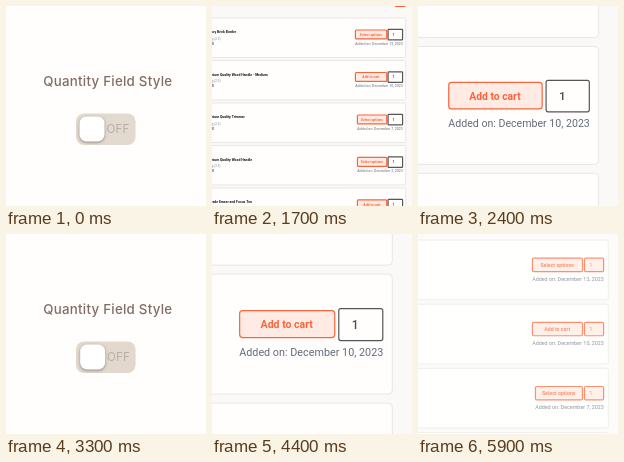
An HTML page with a canvas that plays this animation: 200x200 px, repeating every 6 s.

```html
<!DOCTYPE html>
<html lang="en">
<head>
<meta charset="utf-8">
<title>Quantity field style</title>
<style>
  html, body { margin: 0; width: 100%; height: 100%; overflow: hidden; background: #fffefc; }
  canvas { display: block; width: 200px; height: 200px; }
</style>
</head>
<body>
<canvas id="stage"></canvas>
<script>
const LOOP = 6000, STEP = 100;
const FAR = 28, NEAR = 129; // distance between rows, zoomed out and in
const ORANGE = '#f9643a', PEACH = '#ffebe3', PAPER = '#fffefc';

const ROWS = [
  ['Legacy Brick Border', 'Select options', 'December 13, 2023'],
  ['Premium Quality Wood Handle - Medium', 'Add to cart', 'December 10, 2023'],
  ['Premium Quality Trimmer', 'Select options', 'December 7, 2023'],
  ['Premium Quality Wood Handle', 'Select options', 'December 2, 2023'],
  ['Upgrade Eraser and Focus Ten', 'Add to cart', 'December 1, 2023'],
  ['Legacy Garden Border', 'Select options', 'December 1, 2023']
];
const FOCUS_ROW = 1;

const canvas = document.getElementById('stage');
const ctx = canvas.getContext('2d');
const ratio = window.devicePixelRatio || 1;
canvas.width = canvas.height = 200 * ratio;

const mix = (a, b, p) => a + (b - a) * p;

function ease(t, start, duration) {
  const u = Math.min(1, Math.max(0, (t - start) / duration));
  return u < 0.5 ? 2 * u * u : 1 - 2 * (1 - u) ** 2;
}

// Outlines keep about the same thickness on screen at every zoom.
function box(x, y, w, h, radius, fill, stroke, width = 1.2) {
  ctx.beginPath();
  ctx.roundRect(x, y, w, h, radius);
  ctx.fillStyle = fill;
  ctx.fill();
  if (stroke) {
    ctx.strokeStyle = stroke;
    ctx.lineWidth = width * ratio / ctx.getTransform().a;
    ctx.stroke();
  }
}

function text(string, x, y, font, color, align = 'left', spacing = 0) {
  ctx.font = font;
  ctx.fillStyle = color;
  ctx.textAlign = align;
  ctx.letterSpacing = spacing + 'px';
  ctx.fillText(string, x, y);
}

function drawToggle(on) {
  const labelFont = '11.6px Inter, sans-serif';
  text('Quantity Field Style', 101.8, 79.5, '500 13.3px Inter, sans-serif', '#806c64', 'center', 0.26);
  box(70, 107.4, 59.6, 31.6, 8, '#e3dacf');
  ctx.globalAlpha = on;
  box(70, 107.4, 59.6, 31.6, 8, '#a98b79');
  text('ON', 87, 127.2, labelFont, '#ffffff', 'center');
  ctx.globalAlpha = 1 - on;
  text('OFF', 100.4 + on * 20, 127.2, labelFont, '#b9aca3', 'left', 0.2);
  ctx.globalAlpha = 1;
  ctx.save();
  ctx.shadowColor = 'rgba(75, 65, 85, 0.55)';
  ctx.shadowBlur = 3 * ratio;
  ctx.shadowOffsetY = ratio;
  box(73.5 + on * 27, 110.5, 25, 25, 7, '#ffffff');
  ctx.restore();
}

// Row coordinates start at the right edge of the quantity field, level with its middle.
function drawRow([name, action, date], styled) {
  box(-866, -50, 875, 120, 4, '#fffefd', '#e9e7e5', 1);
  box(-735, -38, 96, 96, 4, '#eee8e1');
  text(name, -600, -4, 'bold 10.4px Roboto, sans-serif', '#101010');
  text('Rating (2.3)', -600, 16, '9px Roboto, sans-serif', '#7d8592');
  text('$24.00', -600, 32, '9px Roboto, sans-serif', '#303030');
  if (styled) box(-552, -41, 13, 2, 0, '#b5b5b5');

  const label = 'Added on: ' + date;
  text(label, 0, 32, '10.8px Roboto, sans-serif', '#626c79', 'right');
  const left = -ctx.measureText(label).width;
  const right = styled ? -43.5 : -49;
  box(left + 0.5, -13.5, right - left, 27, 3, PEACH, ORANGE);
  text(action, (left + right) / 2, 4, 'bold 10.5px Roboto, sans-serif', ORANGE, 'center');

  if (styled) {
    box(-39, -13.5, 38.5, 27, 3, PEACH, ORANGE);
    text('1', -26, 4.5, '11.5px Roboto, sans-serif', ORANGE, 'center');
  } else {
    box(-44.5, -15.5, 44, 32, 2, '#fffefd', '#555658');
    text('1', -28, 4.5, '500 12px Roboto, sans-serif', '#504e49', 'center');
  }
}

function drawList(pitch, focusY, styled) {
  ctx.fillStyle = '#faf9f8';
  ctx.fillRect(0, 0, 200, 200);
  const scale = pitch / NEAR;
  ctx.save();
  ctx.translate(200.3 - 0.225 * pitch, focusY - FOCUS_ROW * pitch);
  ctx.scale(scale, scale);
  box(-24, -108, 33, 25, 3, ORANGE);
  for (const row of ROWS) {
    drawRow(row, styled);
    ctx.translate(0, NEAR);
  }
  ctx.restore();
}

function draw(t) {
  ctx.setTransform(ratio, 0, 0, ratio, 0, 0);
  ctx.fillStyle = PAPER;
  ctx.fillRect(0, 0, 200, 200);

  if (t < 1000) {
    drawToggle(0);
  } else if (t < 3300) {
    const pitch = mix(FAR, NEAR, ease(t, 1400, 1120));
    drawList(pitch, 61.5 + 0.222 * pitch, false);
  } else if (t < 4400) {
    drawToggle(ease(t, 3250, 450));
  } else {
    const pitch = mix(NEAR, FAR, ease(t, 5300, 1040));
    drawList(pitch, 100 - 0.077 * pitch, t >= 4700);
    ctx.fillStyle = PAPER;
    ctx.globalAlpha = Math.max(0, (t - 5700) / 700);
    ctx.fillRect(0, 0, 200, 200);
    ctx.globalAlpha = 1;
  }
}

const begin = performance.now();
function tick() {
  const t = (performance.now() - begin) % LOOP;
  draw(Math.floor(t / STEP) * STEP);
  requestAnimationFrame(tick);
}
tick();
</script>
</body>
</html>
```
